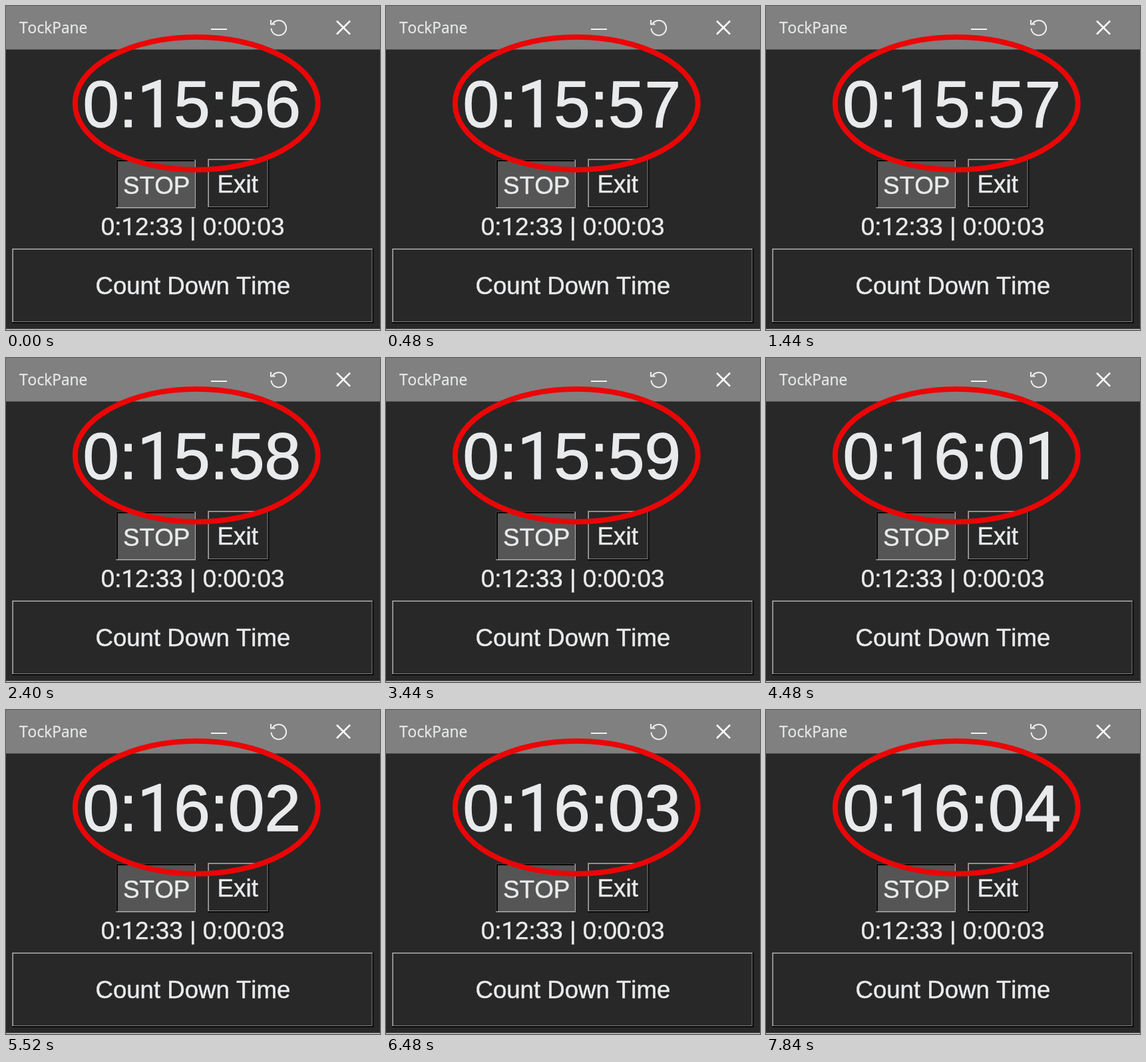
An HTML page with a canvas that plays this animation: 562 by 488 pixels, repeating every 8 s.

```html
<!DOCTYPE html>
<html lang="en">
<head>
<meta charset="utf-8">
<title>Timer</title>
<style>
html, body { margin: 0; width: 100%; height: 100%; overflow: hidden; background: #282828; }
canvas { display: block; }
</style>
</head>
<body>
<canvas id="stage" width="562" height="488"></canvas>
<script>
const ctx = document.getElementById('stage').getContext('2d');
const LOOP = 8000, STEP = 80;
const START = 15 * 60 + 56;
const PHASE = 540; // ms already elapsed in the first second
const SANS = '"Liberation Sans", Arial, sans-serif';
const PLAIN_ONE = 'Roboto, sans-serif'; // its "1" has no foot
const UI = '"Open Sans", "Noto Sans", sans-serif';

function rect(x, y, w, h, color) {
  ctx.fillStyle = color;
  ctx.fillRect(x, y, w, h);
}

// Sets text letter by letter, without kerning; weight thickens the strokes.
function text(str, x, y, size, weight = 0.5, family = SANS) {
  ctx.fillStyle = ctx.strokeStyle = '#e8eaec';
  ctx.lineWidth = weight;
  ctx.lineJoin = 'round';
  for (const ch of str) {
    ctx.font = `${size}px ${ch === '1' ? PLAIN_ONE : family}`;
    ctx.fillText(ch, x, y);
    ctx.strokeText(ch, x, y);
    x += ctx.measureText(ch).width;
  }
}

function stroke(color, width, path) {
  ctx.strokeStyle = color;
  ctx.lineWidth = width;
  ctx.lineJoin = 'miter';
  ctx.beginPath();
  path();
  ctx.stroke();
}

function titleBar() {
  rect(0, 0, 562, 65.5, '#808080');
  text('TockPane', 20, 41, 22.8, 0.3, UI);
  rect(308, 34, 24, 2, '#f0f0f0');
  stroke('#eeeeee', 2, () => {
    ctx.arc(409.8, 33, 11.3, -2.55, 3.1);
    ctx.moveTo(398, 21);
    ctx.lineTo(398, 27.5);
    ctx.lineTo(404.5, 27.5);
  });
  stroke('#fafafa', 2.5, () => {
    ctx.moveTo(497, 22.5);
    ctx.lineTo(517, 42.5);
    ctx.moveTo(517, 22.5);
    ctx.lineTo(497, 42.5);
  });
}

function raised(x, y, w, h) {
  rect(x, y, w, h, '#080808');
  rect(x, y, w - 2, h - 2, '#808080');
  rect(x, y, w - 2, 1.5, '#a4a4a4');
  rect(x, y, 1.5, h - 2, '#a4a4a4');
  rect(x + 1.5, y + 1.5, w - 4.5, h - 4.5, '#282828');
}

function sunken(x, y, w, h) {
  rect(x, y, w, h, '#b0b0b0');
  rect(x, y, w - 1.5, h - 1.5, '#080808');
  rect(x + 2.5, y + 2.5, w - 4, h - 4, '#555555');
}

function clock(total) {
  const pad = n => String(n).padStart(2, '0');
  return `0:${pad(Math.floor(total / 60))}:${pad(total % 60)}`;
}

function draw(t) {
  const shown = Math.floor(t / STEP) * STEP;
  const seconds = START + Math.floor((shown + PHASE) / 1000);

  rect(0, 0, 562, 488, '#282828');
  titleBar();
  text(clock(seconds), 115.5, 181.5, 98, 1.4);
  sunken(165.5, 231.5, 119.5, 73);
  text('STOP', 176, 282.5, 36.9);
  raised(303.5, 230.5, 92, 74.5);
  text('Exit', 317.5, 281, 36.9);
  text('0:12:33 | 0:00:03', 142.7, 344.5, 36.8);
  raised(9.5, 365.5, 543, 112.5);
  text('Count Down Time', 134.5, 434, 36.6);
  rect(0, 486.5, 562, 1.5, '#c8c8c8');
  stroke('#ea0606', 8, () => ctx.ellipse(286.3, 146.7, 182.5, 100, 0, 0, Math.PI * 2));
}

const begin = performance.now();
function frame() {
  draw((performance.now() - begin) % LOOP);
  requestAnimationFrame(frame);
}
draw(0);
requestAnimationFrame(frame);
</script>
</body>
</html>
```
